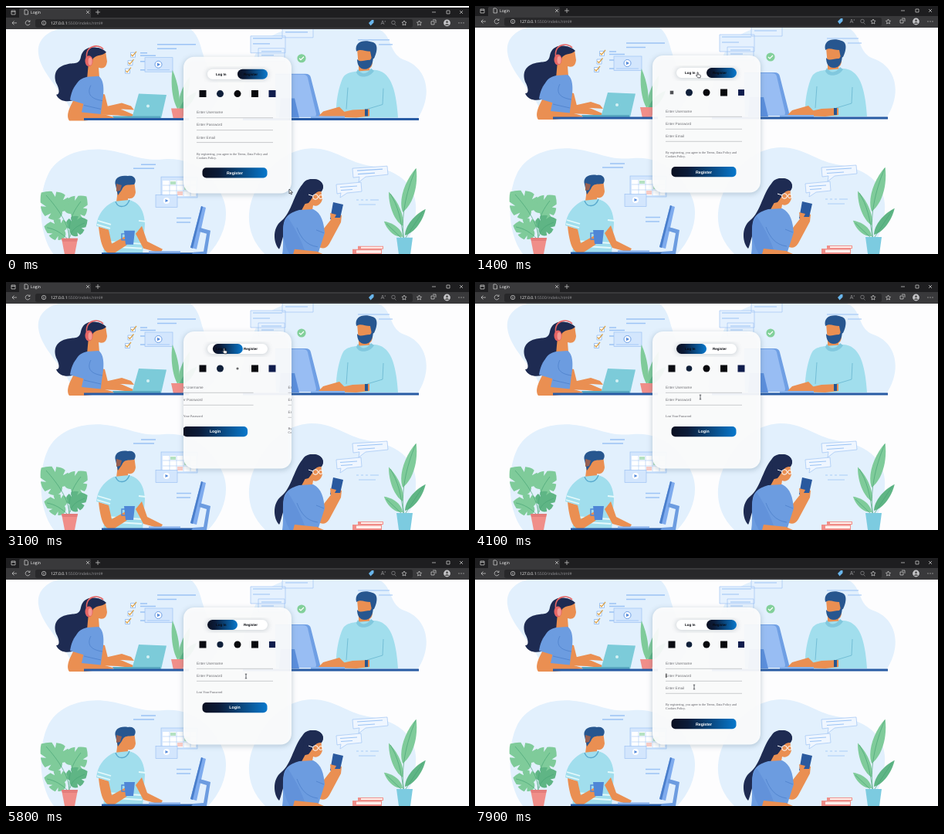
These frames come from a looping animation (600x321 px, 8 s). An HTML page:

```html
<!DOCTYPE html>
<html lang="en">
<head>
<meta charset="utf-8">
<title>Login</title>
<style>
html, body { margin: 0; width: 100%; height: 100%; overflow: hidden; background: #fdfdfe; }
svg { display: block; width: 600px; height: 321px; }
text { font-family: "Liberation Sans", Arial, sans-serif; text-rendering: geometricPrecision; }
.ui { font: 5.1px "Open Sans", sans-serif; fill: #fff; }
.tab { font-weight: bold; font-size: 4.5px; fill: #080a10; }
.btn { font-weight: bold; font-size: 5.25px; fill: #fff; text-anchor: middle; }
.hint { font-size: 4.7px; fill: #6f7075; }
.fine { font: 4.15px "Liberation Serif", serif; fill: #55555c; }
.line { fill: none; stroke: #a6a8ad; stroke-width: .6; }
.tool { fill: none; stroke: #d5d5d5; stroke-width: .7; }
.dim { stroke: #8d8d90; }
.blob { fill: #e2f0fd; }
.navy { fill: #1e2b52; }
.hair { fill: #27568f; }
.skin { fill: #ea8f52; }
.blue { fill: #4f86d6; }
.shirt { fill: #6c9ce0; }
.aqua { fill: #a1deed; }
.pale { fill: #d3e6fd; stroke: #94bdf2; stroke-width: .6; }
.bars { fill: none; stroke: #9cc4f5; stroke-width: 1.5; }
.fold { fill: none; stroke: #4378c4; stroke-width: .6; }
.desk { fill: #285ba4; }
.pot { fill: #f08e89; }
.green { fill: #7fcb9a; }
.dark { fill: #5fb585; }
.vein { fill: none; stroke: #4aa577; stroke-width: .7; }
</style>
</head>
<body>
<svg viewBox="0 0 600 321">
<defs>
  <linearGradient id="grad"><stop offset="0" stop-color="#0b1021"/><stop offset=".25" stop-color="#0b1b38"/><stop offset="1" stop-color="#0878cc"/></linearGradient>
  <filter id="soft" x="-20%" y="-20%" width="140%" height="140%"><feGaussianBlur stdDeviation="3"/></filter>
  <clipPath id="page"><path d="M0 28H600V321H0z"/></clipPath>
  <clipPath id="card"><rect x="230" y="64" width="140" height="177.5" rx="14"/></clipPath>
  <path id="leaf" d="M0 0C-9-7-8-20 0-30C8-20 9-7 0 0z"/>
  <path id="split" d="M0 0C-6 6-15 2-16-7L-10-8L-17-11Q-16-18-12-22L-8-17L-9-25Q-4-30 0-32Q6-28 9-24L7-17L12-20Q16-15 16-10L10-8L16-6C14 3 6 5 0 0z"/>
</defs>
<g id="screen">
<rect width="600" height="323" fill="#fdfdfe"/>
<g clip-path="url(#page)">
  <!-- woman with headphones -->
  <path class="blob" d="M86 145C87 119 45 90 42 60C40 43 52 31 72 27H238C256 40 251 65 266 82C285 104 276 132 250 145z"/>
  <path class="bars" d="M196 48h50M196 53.5h25M174 59h9M174 62.5h20M174 70h7M174 81h6"/>
  <g fill="#fff" stroke="#8bb6ef" stroke-width=".8"><path d="M161.500 58.500h6v6h-6zM158 69h6v6h-6zM154.500 79.500h6v6h-6z"/></g>
  <path d="M162 61l2 2 5-6M158.500 71.500l2 2 5-6M155 82l2 2 5-6" fill="none" stroke="#dba24a" stroke-width="1.2"/>
  <rect class="pale" x="180" y="65" width="36" height="18.500"/>
  <circle cx="197.500" cy="74" r="4.500" fill="#fff" stroke="#6b9ee5"/><path d="M196 71.700l4 2.300-4 2.300z" fill="#5288da"/><path class="bars" d="M183 81h29" style="stroke-width:.8"/>
  <path class="navy" d="M121 53C108 49 99 54 97 64C95 75 88 71 78 74C61 78 62 92 66 100C70 108 69 114 65 113C69 124 84 123 91 119L110 95L121 69z"/>
  <path class="skin" d="M113 58L129 57L131 70C130 78 126 80 120 78L121 91L105 93L107 71z"/>
  <path class="navy" d="M104 61C109 50 122 50 130 58C125 63 118 61 113 66L109 75L103 72z"/>
  <path d="M105 68C101 48 121 47 126 54" fill="none" stroke="#e66564" stroke-width="1.600"/>
  <ellipse cx="107.500" cy="69.500" rx="5" ry="7" fill="#e66564"/><ellipse cx="109" cy="70" rx="2.500" ry="5" fill="#f49a94"/>
  <path class="skin" d="M112 109L128 113L132 129L151 133L165 139L163 142L145 140L120 139z"/>
  <path class="skin" d="M128 129L150 124L162 128L166 133L151 132L132 136z"/>
  <path class="shirt" d="M105 90L120 89C128 94 127 111 125 121L122 144H88C84 131 88 109 91 100C94 94 98 92 105 90z"/>
  <path class="fold" d="M110 101C104 113 111 119 125 121M101 127L123 132"/>
  <path class="skin" d="M89 118L101 122L98 136L128 139L142 143L102 147H82C77 140 83 128 89 118z"/>
  <path class="shirt" d="M95 97C87 101 84 113 83 120L103 126C107 114 106 99 95 97z"/>
  <path d="M172 112L208 113.500L201 144H163z" fill="#7ccbd9"/><path d="M138 141H200V144H140z" fill="#58a8c0"/><circle cx="184" cy="128" r="2" fill="#d5f1f4"/>
  <g class="green">
    <use href="#leaf" transform="translate(223 133) rotate(-8) scale(.65 1.750)"/>
    <use href="#leaf" transform="translate(224 133) rotate(18) scale(.7 1.500)"/>
    <use href="#leaf" class="dark" transform="translate(225 134) rotate(42) scale(.7 1.100)"/>
  </g>
  <path class="pot" d="M214 131H232L229 145H217z"/>
  <path class="desk" d="M101 143.500H237V146.500H101z"/>

  <!-- man at the monitor -->
  <path class="blob" d="M303 145C299 115 314 91 319 72C327 45 347 28 382 27H478C502 31 494 60 516 68C546 78 554 113 533 145z"/>
  <g class="pale" style="fill:#e5f1fe"><path d="M317 37h45v22h-45zM358 24h40v15h-40zM327 53h34v17h-34z"/></g>
  <path class="bars" d="M320 40h38M320 47h22M362 32h29M331 57h26M331 62h16M331 66h22M456 42h41M483 48h18" style="stroke-width:1.200"/>
  <circle cx="383" cy="66" r="5.600" fill="#82d09a"/><path d="M380 66l2 2 4-4" fill="none" stroke="#fff" stroke-width="1.200"/>
  <path d="M349 86H388Q394 86 395 91L407 138Q408 142 403 142H350z" fill="#6f9fe4"/><path d="M349 87H385Q390 87 391 91L402 138Q402 142 399 142H350z" fill="#98bdf3"/>
  <path d="M356 118H374L380 143H354z" fill="#5b8fdd"/>
  <path class="skin" d="M455 54L475 53V69C475 76 473 78 471 79L474 90L457 91L457 77z"/>
  <path class="hair" d="M454 57C451 44 464 41 475 45C483 47 481 58 477 66L474 67L472 57C465 57 459 53 454 57z"/>
  <path class="hair" d="M455 67C459 72 464 68 472 68L476 62C476 74 472 80 465 80C458 80 455 74 455 67z"/>
  <path class="aqua" d="M453 83L478 81C497 83 505 101 508 143H429C425 127 433 95 438 89C442 85 447 84 453 83z"/>
  <path d="M454 84C457 93 472 91 477 82L473 79C467 88 460 87 456 80z" fill="#81c8de"/>
  <path d="M443 104L441 132M489 105L488 126L468 132" fill="none" stroke="#67b5d0" stroke-width=".8"/>
  <path class="skin" d="M471 132L449 133L431 137L420 142L454 143L471 141z"/>
  <path class="skin" d="M432 129L411 135L405 141L423 142L440 137z"/>
  <path class="hair" d="M465 132h4v9h-4z"/>
  <path d="M395 141H439V144H395z" fill="#88b3ed"/>
  <path class="desk" d="M307 143.500H535V146.500H307z"/>

  <!-- man with a cup -->
  <path class="blob" d="M62 321C42 296 41 246 54 218C67 190 103 180 136 186C164 191 176 200 205 197C244 194 271 220 282 250C290 272 282 300 262 321z"/>
  <path class="bars" d="M175 204h19M165 209h27M221 273.500h19M221 279h18"/>
  <rect class="pale" x="201" y="220" width="47" height="27"/><path d="M203 225h43v20h-43z" fill="#fff"/>
  <path d="M203 231h43M203 238h43M212 225v20M221 225v20M230 225v20M239 225v20" fill="none" stroke="#a8caf4" stroke-width=".6"/>
  <path d="M213 226h7v4h-7zM231 232h7v5h-7z" fill="#b5e2c2"/><path d="M222 239h7v5h-7z" fill="#f7cbc5"/>
  <rect class="pale" x="194" y="243.500" width="28" height="16"/><circle cx="208" cy="251" r="4" fill="#fff"/><path d="M206.500 249l4 2-4 2z" fill="#5288da"/>
  <path class="skin" d="M145 226L166 225L168 240C167 247 163 249 158 248L159 259L142 260L144 245z"/>
  <path class="hair" d="M142 231C139 221 149 217 158 219C167 217 170 225 166 230C158 231 153 229 150 237L145 244z"/><path d="M143 229L150 231L148 238L143 239z" fill="#976052"/>
  <path class="aqua" d="M140 252L159 250C173 253 179 264 180 281L177 321H126L130 288L117 284C119 267 129 257 140 252z"/>
  <path d="M119 277L136 282M118 282L135 287M128 304L177 307M127 310L176 313M172 277L181 278" fill="none" stroke="#e4f9fb" stroke-width="1.800"/>
  <path d="M142 252C145 261 156 261 160 250" fill="none" stroke="#58a9cd" stroke-width="1.300"/>
  <path class="skin" d="M120 285L133 289L137 307L155 297L163 300L156 309L139 320C128 321 123 312 120 285z"/>
  <path class="blue" d="M153 290H167L165 308H155z"/><path d="M154 294H150V302H155" fill="none" stroke="#4f86d6" stroke-width="1.400"/>
  <path class="skin" d="M176 284L183 304L203 314L200 319L178 313L168 294z"/>
  <path class="desk" d="M124 318.500H244V321H124z"/><path d="M185 316.500H226V319H185z" fill="#84aeea"/>
  <path d="M253 258L259 260L247 314L239 312z" fill="#7eabee"/><path d="M253 258L255 259L242 313L239 312z" fill="#4a7ecb"/><path class="shirt" d="M251 286L265 290L260 321H240L243 318L256 317L260 294L250 291z"/>
  <g class="green">
    <use href="#split" transform="translate(73 265) rotate(-48) scale(1.150)"/>
    <use href="#split" transform="translate(84 268) rotate(42) scale(.95)"/>
    <use href="#split" class="dark" transform="translate(83 288) rotate(62) scale(.8)"/>
    <use href="#split" transform="translate(76 290) rotate(-78) scale(.85)"/>
  </g>
  <path class="vein" d="M82 304C82 286 80 274 97 252M82 302C82 281 67 261 52 244M83 298C85 288 92 284 102 280M81 302C72 293 64 288 53 286"/>
  <path class="pot" d="M72 300H93L89 321H76z"/><path d="M72 300H93L92 304H73z" fill="#e37d7b"/>

  <!-- woman with a phone -->
  <path class="blob" d="M336 321C310 296 311 263 323 239C335 211 361 184 396 183C427 183 443 202 474 206C512 212 533 234 531 264C530 292 516 312 508 321z"/>
  <g class="pale" style="fill:#eff6ff"><path d="M449 209L494 206L495 217L466 220L457 227L458 220L450 221zM428 230L460 227L461 239L442 241L433 247L434 241L429 242z"/></g>
  <path class="bars" d="M455 212l33-2M456 216.500l22-1.500M433 233.500l22-1.500M434 237.500l15-1" style="stroke-width:1.100"/>
  <path d="M454 250h3M460 250h3M466 250h3M472 250h11M457 256h22" stroke="#a9cdf7" stroke-width="1.200"/>
  <path class="navy" d="M396 223C411 222 415 234 407 241L393 264C386 280 371 272 362 289C357 303 356 311 354 314C346 306 345 286 357 277C369 268 374 241 384 230C387 225 391 223 396 223z"/>
  <path class="skin" d="M395 235L408 237L410 249C408 257 402 259 398 257L396 269L379 271L387 256z"/>
  <path class="navy" d="M393 224C406 219 416 232 408 239C400 238 398 247 392 254L384 256L386 233z"/>
  <g fill="none" stroke="#fff" stroke-width="1"><circle cx="401" cy="246" r="3.300"/><circle cx="408" cy="246" r="2.500"/><path d="M398 245l-6-2"/></g>
  <path class="skin" d="M405 296L423 273L426 266L435 270L434 279L419 307C412 318 404 311 396 304z"/>
  <path d="M424 253L437 256L432 278L420 275z" fill="#2a599e"/><path class="skin" d="M420 267L428 269L426 273L434 273L432 279L422 282z"/>
  <path class="shirt" d="M380 263L398 262C409 267 412 280 413 293L404 321H358C361 305 356 281 363 273C367 267 374 265 380 263z"/>
  <path d="M365 272C355 282 359 307 368 321H389C384 306 378 292 365 272z" fill="#6292da"/>
  <path class="fold" d="M377 286C382 299 389 309 404 311M402 289L412 293"/>
  <path class="skin" d="M374 314L403 317L412 321H372z"/>
  <path class="pot" d="M449 314H487V321H449zM456 310H489V314H456z"/><path d="M454 315.500H486V319H454zM460 311H488V313H460z" fill="#fff0ec"/>
  <g class="green">
    <use href="#leaf" transform="translate(514 266) rotate(17) scale(1.150 2)"/>
    <use href="#leaf" transform="translate(514 284) rotate(-22) scale(.85 1.600)"/>
    <use href="#leaf" class="dark" transform="translate(517 296) rotate(38) scale(.85 1.450)"/>
    <use href="#leaf" transform="translate(514 298) rotate(-50) scale(.8 1.050)"/>
  </g>
  <path class="vein" d="M516 302C511 275 518 240 531 210M515 300C512 275 508 258 498 242M515 302L493 281M516 302L541 264"/>
  <path d="M506 299H527L524 321H509z" fill="#7ccbe0"/>

  <!-- card -->
  <rect x="229" y="65" width="142" height="179" rx="14" fill="#416078" opacity=".25" filter="url(#soft)"/>
  <rect x="230" y="64" width="140" height="177.500" rx="14" fill="#fdfdfd" opacity=".93"/>
  <rect x="260" y="80" width="80" height="14" rx="7" fill="#567" opacity=".27" filter="url(#soft)"/>
  <rect x="261" y="80" width="78" height="13" rx="6.500" fill="#fff"/>
  <rect id="pill" x="261" y="80" width="39" height="13" rx="6.500" fill="url(#grad)"/>
  <text class="tab" x="272" y="88">Log In</text><text class="tab" x="308" y="88">Register</text>
  <g id="icons"></g>
  <g clip-path="url(#card)">
    <g id="login">
      <text class="hint" x="247" y="137.700">Enter Username</text><text class="hint" x="247" y="154">Enter Password</text>
      <path class="line" d="M247 143.300h99M247 159.300h99"/>
      <text class="fine" x="247" y="175">Lost Your Password</text>
      <rect x="254.500" y="187" width="84" height="13.300" rx="5" fill="url(#grad)"/><text class="btn" x="296.500" y="195.400">Login</text>
    </g>
    <g id="register">
      <text class="hint" x="247" y="137.700">Enter Username</text><text class="hint" x="247" y="154">Enter Password</text><text class="hint" x="247" y="170.200">Enter Email</text>
      <path class="line" d="M247 143.300h99M247 159.300h99M247 175.300h99"/>
      <text class="fine" x="247" y="191.300">By registering, you agree to the Terms, Data Policy and</text><text class="fine" x="247" y="196.300">Cookies Policy.</text>
      <rect x="254.500" y="208" width="84" height="13.300" rx="5" fill="url(#grad)"/><text class="btn" x="296.500" y="216.500">Register</text>
      <path id="caret" d="M247.800 149.500v5.500" stroke="#111" stroke-width=".9"/>
    </g>
  </g>
</g>

<!-- browser -->
<path d="M0 0H600V28H0z" fill="#1e1e20"/>
<path d="M0 13H17V3Q17 1 19 1H108Q110 1 110 3V13H600V28H0z" fill="#39393b"/>
<rect x="38" y="15" width="489" height="11" rx="2.500" fill="#28282a"/>
<path class="tool" d="M7 4h5v5h-5zM7 5.500h5M24 3h3l1.500 1.500v4.500h-4.500zM104 4l4 4M108 4l-4 4M116 6h6M119 3v6M552 6h5M571 4h4v4h-4zM588 4l4 4M592 4l-4 4M14 20h-6M10.500 17.500l-2.500 2.500 2.500 2.500"/>
<path class="tool" d="M30.500 18A3 3 0 1 0 31 21M31 16.500v2h-2M49 18.700v3M551 18h4v4h-4zM553 16h4v4"/>
<path class="tool dim" d="M486 22l2-5 2 5M487 20.500h2M491 17q1 1 0 2M503.500 21.500l2 2"/>
<circle class="tool" cx="49" cy="20" r="2.700"/><circle class="tool dim" cx="502" cy="19.500" r="2.300"/>
<path id="star" class="tool" d="M516 17l1 2 2 .3-1.500 1.500.4 2.200-1.900-1-1.900 1 .4-2.200-1.500-1.500 2-.3z"/><use href="#star" x="19.500"/>
<path d="M470 20l4-4h2.500v3.500l-4 4z" fill="#69b5ec"/>
<circle cx="571.500" cy="20" r="4.400" fill="#c5c5c8"/><circle cx="571.500" cy="18.700" r="1.500" fill="#555"/><path d="M568.500 23q3-4 6 0z" fill="#555"/>
<path d="M586.500 20h1M589.500 20h1M592.500 20h1" stroke="#ddd"/>
<text class="ui" x="32" y="8">Login</text>
<text class="ui" x="58" y="22">127.0.0.1<tspan fill="#8f8f92">:5500/indeks.html#</tspan></text>

<path id="cursor"/>
</g>
</svg>
<script>
const $ = id => document.getElementById(id);
const LOOP = 8000;

// [time, x, y]
const route = [[0, 367, 236], [300, 367, 236], [1100, 288, 86], [1550, 288, 86], [1900, 299, 84], [2150, 316, 85],
  [2500, 316, 85], [2800, 282, 86], [3300, 282, 86], [4100, 292, 149], [5100, 300, 151], [5800, 311, 153],
  [6400, 316, 85], [6800, 316, 85], [7400, 268, 152], [7600, 268, 152], [7900, 284, 167]];
// [time, 1 = register, 0 = login]
const clicks = [[0, 1], [1470, 0], [2150, 1], [2840, 0], [6550, 1]];
// x, shape, colour, dips as [time, scale]
const icons = [
  [255, "square", "#0b0c12", [[1400, .5]]],
  [277.500, "circle", "#10203a", [[4100, .85], [5800, .9], [7900, .85]]],
  [300, "circle", "#08090d", [[3100, .35]]],
  [322.500, "square", "#08090d", []],
  [345, "square", "#101d4d", [[1400, .88], [5800, .9], [7900, .9]]]
];
const shapes = {
  square: "M-4.500-4.500h9v9h-9z",
  circle: "M-4.500 0a4.500 4.500 0 1 0 9 0a4.500 4.500 0 1 0-9 0"
};
const pointers = {
  arrow: "M0 0v6l1.500-1.300 1 2.300 1-.5-1-2.200h2z",
  hand: "M0 0q1-.8 1.200.3v2.400l2.600.6q.8.3.6 1.500l-.5 2h-3l-2.500-3q.1-.9 1.600.2z",
  beam: "M-1.200-2.800h2.400M0-2.800v5.600M-1.200 2.800h2.400"
};

const marks = icons.map(([, shape, color]) => {
  const p = document.createElementNS("http://www.w3.org/2000/svg", "path");
  p.setAttribute("d", shapes[shape]);
  p.setAttribute("fill", color);
  return $("icons").appendChild(p);
});
const move = (el, x, y = 0, s = 1) => el.setAttribute("transform", `translate(${x} ${y}) scale(${s})`);

// CSS "ease": cubic-bezier(.25, .1, .25, 1)
function ease(p) {
  if (p >= 1) return 1;
  const bez = (a, b, u) => 3 * a * u * (1 - u) ** 2 + 3 * b * u * u * (1 - u) + u ** 3;
  let lo = 0, hi = 1;
  for (let i = 0; i < 20; i++) {
    const mid = (lo + hi) / 2;
    if (bez(.25, .25, mid) < p) lo = mid; else hi = mid;
  }
  return bez(.1, 1, lo);
}

function place(t) {
  const i = route.findIndex(k => k[0] > t);
  if (i < 0) return route.at(-1).slice(1);
  const [a, b] = [route[i - 1], route[i]];
  const p = (t - a[0]) / (b[0] - a[0]), q = p * p * (3 - 2 * p);
  return [a[1] + (b[1] - a[1]) * q, a[2] + (b[2] - a[2]) * q];
}

function draw(t) {
  // the window sits slightly lower until it settles
  $("screen").setAttribute("transform", t < 900 ? "translate(0 2) scale(1 .996)" : "");

  const [at, to] = clicks.findLast(c => c[0] <= t);
  const e = at ? ease((t - at) / 500) : 1;
  const side = to ? e : 1 - e;
  move($("pill"), 39 * side);
  move($("login"), -144 * side);
  move($("register"), 144 * (1 - side));
  $("caret").style.display = t >= 7500 ? "" : "none";

  icons.forEach(([x, , , dips], i) => {
    let s = 1;
    for (const [time, low] of dips) {
      const d = Math.abs(t - time) / 350;
      if (d < 1) s -= (1 - low) * (1 + Math.cos(Math.PI * d)) / 2;
    }
    move(marks[i], x, 112, s);
    marks[i].setAttribute("opacity", s < .7 ? .4 + .6 * s : 1);
  });

  const [x, y] = place(t), c = $("cursor");
  const inX = x > 246 && x < 347;
  const kind = inX && y > 79 && y < 94 ? "hand" : inX && y > 131 && y < 176 ? "beam" : "arrow";
  c.setAttribute("d", pointers[kind]);
  c.setAttribute("fill", kind === "beam" ? "none" : "#fff");
  c.setAttribute("stroke", "#22252b");
  c.setAttribute("stroke-width", .7);
  move(c, x, y);
}

function tick() {
  draw(performance.now() % LOOP);
  requestAnimationFrame(tick);
}
tick();
</script>
</body>
</html>
```
